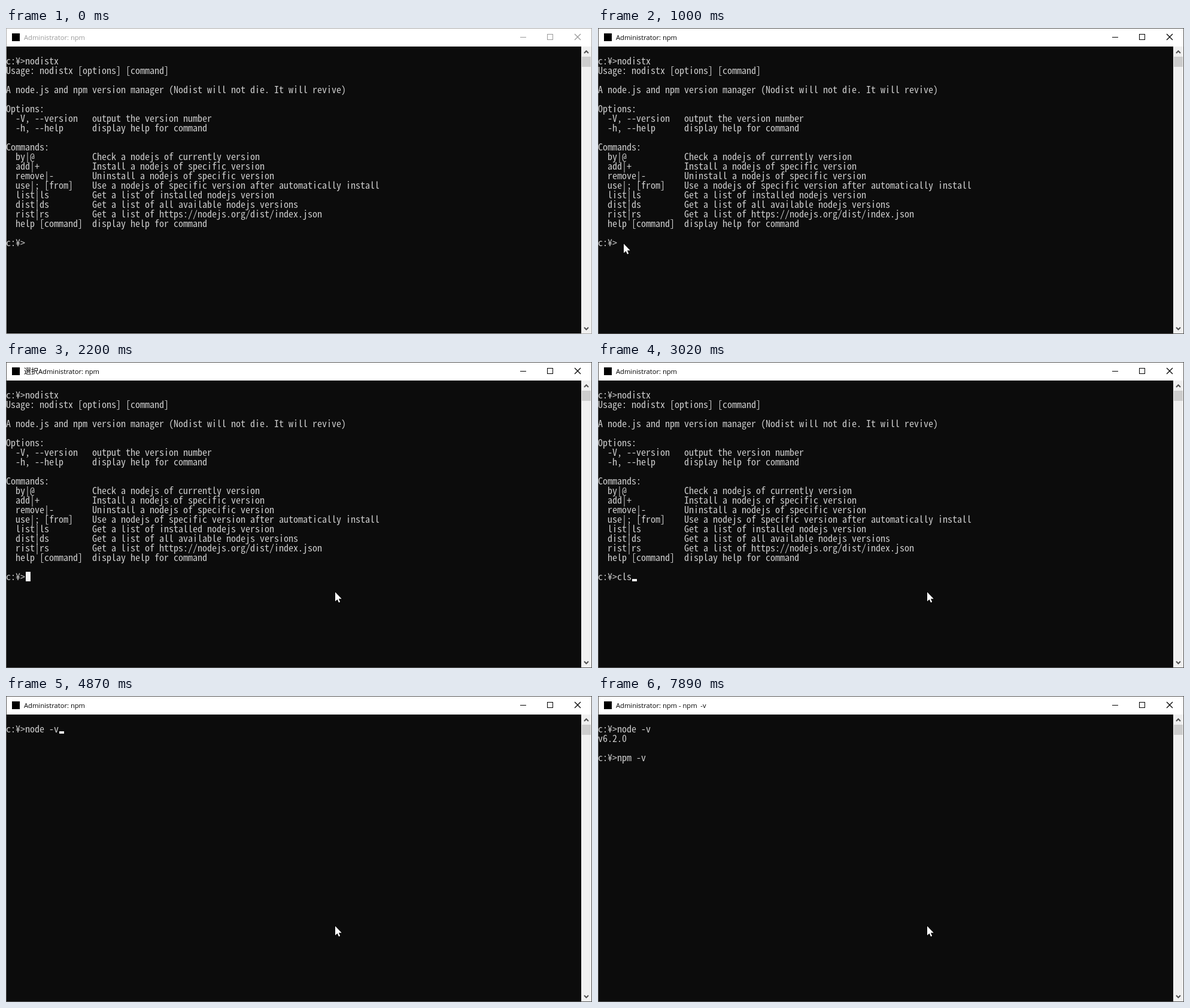
An HTML page with a canvas for the animation above (8000 ms loop, 979 by 512 pixels).

```html
<!DOCTYPE html>
<html lang="en">
<head>
<meta charset="utf-8">
<title>Console</title>
<style>
html, body { margin: 0; width: 100%; height: 100%; overflow: hidden; }
canvas { display: block; }
</style>
</head>
<body>
<canvas id="stage" width="979" height="512"></canvas>
<script>
const ctx = document.getElementById('stage').getContext('2d');
const LOOP = 8000, CELL_W = 8, CELL_H = 16, LEFT = 1, TOP = 31;
const MONO = '"Noto Sans Mono CJK JP", "Liberation Mono", monospace';

const PROMPT = 'c:¥>';
const HELP = `
${PROMPT}nodistx
Usage: nodistx [options] [command]

A node.js and npm version manager (Nodist will not die. It will revive)

Options:
  -V, --version   output the version number
  -h, --help      display help for command

Commands:
  by|@            Check a nodejs of currently version
  add|+           Install a nodejs of specific version
  remove|-        Uninstall a nodejs of specific version
  use|; [from]    Use a nodejs of specific version after automatically install
  list|ls         Get a list of installed nodejs version
  dist|ds         Get a list of all available nodejs versions
  rist|rs         Get a list of https://nodejs.org/dist/index.json
  help [command]  display help for command

${PROMPT}`;
const CLEAR = '\n' + PROMPT;
const NODE = CLEAR + 'node -v\n';
const NPM = NODE + 'v6.2.0\n\n' + PROMPT;

// Each entry changes part of the state from its time on.
const timeline = [
  [0, { active: false, prefix: '', title: 'Administrator: npm', text: HELP, caret: '', mouse: null }],
  [400, { active: true, caret: 'line' }],
  [600, { mouse: [160, 480] }],
  [800, { mouse: [75, 400] }],
  [1000, { mouse: [42, 360], caret: '' }],
  [1200, { mouse: [38, 357] }],
  [1400, { mouse: [36, 355], caret: 'line' }],
  [1600, { prefix: '選択', caret: 'block' }],
  [1800, { mouse: [130, 362] }],
  [2000, { mouse: [400, 378] }],
  [2200, { mouse: [549, 384] }],
  [2620, { prefix: '', caret: 'line' }],
  [2820, { text: HELP + 'c' }],
  [3020, { text: HELP + 'cls' }],
  [3270, { text: CLEAR }],
  [4270, { text: CLEAR + 'no' }],
  [4470, { text: CLEAR + 'node' }],
  [4670, { text: CLEAR + 'node -' }],
  [4870, { text: CLEAR + 'node -v' }],
  [5290, { caret: '' }],
  [5890, { caret: 'line' }],
  [6290, { text: NODE }],
  [6490, { text: NPM }],
  [7090, { text: NPM + 'np' }],
  [7290, { text: NPM + 'npm ' }],
  [7490, { text: NPM + 'npm -v' }],
  [7690, { text: NPM + 'npm -v\n', title: 'Administrator: npm - npm\u00a0 -v' }],
  [7890, { caret: '' }]
];

function stateAt(time) {
  const state = {};
  for (const [start, change] of timeline) if (start <= time) Object.assign(state, change);
  return state;
}

function rect(x, y, w, h, color) {
  ctx.fillStyle = color;
  ctx.fillRect(x, y, w, h);
}

function path(points, close) {
  ctx.beginPath();
  for (const [x, y] of points) ctx.lineTo(x, y);
  if (close) ctx.closePath();
}

function line(points, color, width = 1) {
  path(points);
  ctx.strokeStyle = color;
  ctx.lineWidth = width;
  ctx.stroke();
}

function drawWindow({ active, prefix, title }) {
  const ink = active ? '#000' : '#999';
  rect(0, 0, 979, 512, active ? '#555' : '#aaa');
  rect(1, 1, 977, 30, '#fff');
  rect(10, 9, 13, 13, '#000');

  ctx.fillStyle = ink;
  ctx.font = '12px "Noto Sans CJK JP", sans-serif';
  ctx.fillText(prefix, 30, 20);
  ctx.font = '11.2px "Open Sans", "Noto Sans", sans-serif';
  ctx.fillText(title, prefix ? 54 : 30, 20);

  rect(859, 15, 10, 1, ink);
  ctx.strokeStyle = ink;
  ctx.lineWidth = 1;
  ctx.strokeRect(904.5, 10.5, 9, 9);
  line([[950, 10], [960, 20]], ink, 1.2);
  line([[960, 10], [950, 20]], ink, 1.2);

  rect(1, TOP, 960, 480, '#0c0c0c');
  rect(961, TOP, 17, 480, '#f0f0f0');
  rect(962, 48, 15, 17, '#cdcdcd');
  line([[966, 42], [969.5, 38.5], [973, 42]], '#505050', 2);
  line([[966, 501], [969.5, 504.5], [973, 501]], '#505050', 2);
}

function drawConsole({ text, caret }) {
  ctx.font = `16px ${MONO}`;
  ctx.font = `${16 * CELL_W / ctx.measureText('0').width}px ${MONO}`;
  ctx.fillStyle = '#ccc';
  const rows = text.split('\n');
  rows.forEach((row, r) => [...row].forEach((char, c) => {
    if (char !== ' ') ctx.fillText(char, c * CELL_W, TOP + r * CELL_H + 14);
  }));

  const height = { line: 4, block: CELL_H }[caret];
  if (height) {
    const x = LEFT + rows[rows.length - 1].length * CELL_W;
    rect(x, TOP + rows.length * CELL_H - height, CELL_W, height, '#f2f2f2');
  }
}

function drawMouse([x, y]) {
  ctx.save();
  ctx.translate(x + 1, y + 1);
  path([[0, 0], [0, 15.5], [3.6, 12.2], [6, 17.5], [8.2, 16.5], [5.9, 11.2], [10.8, 11.2]], true);
  ctx.strokeStyle = '#000';
  ctx.lineWidth = 1.5;
  ctx.stroke();
  ctx.fillStyle = '#fff';
  ctx.fill();
  ctx.restore();
}

function draw() {
  const state = stateAt(performance.now() % LOOP);
  drawWindow(state);
  drawConsole(state);
  if (state.mouse) drawMouse(state.mouse);
  requestAnimationFrame(draw);
}
draw();
</script>
</body>
</html>
```
